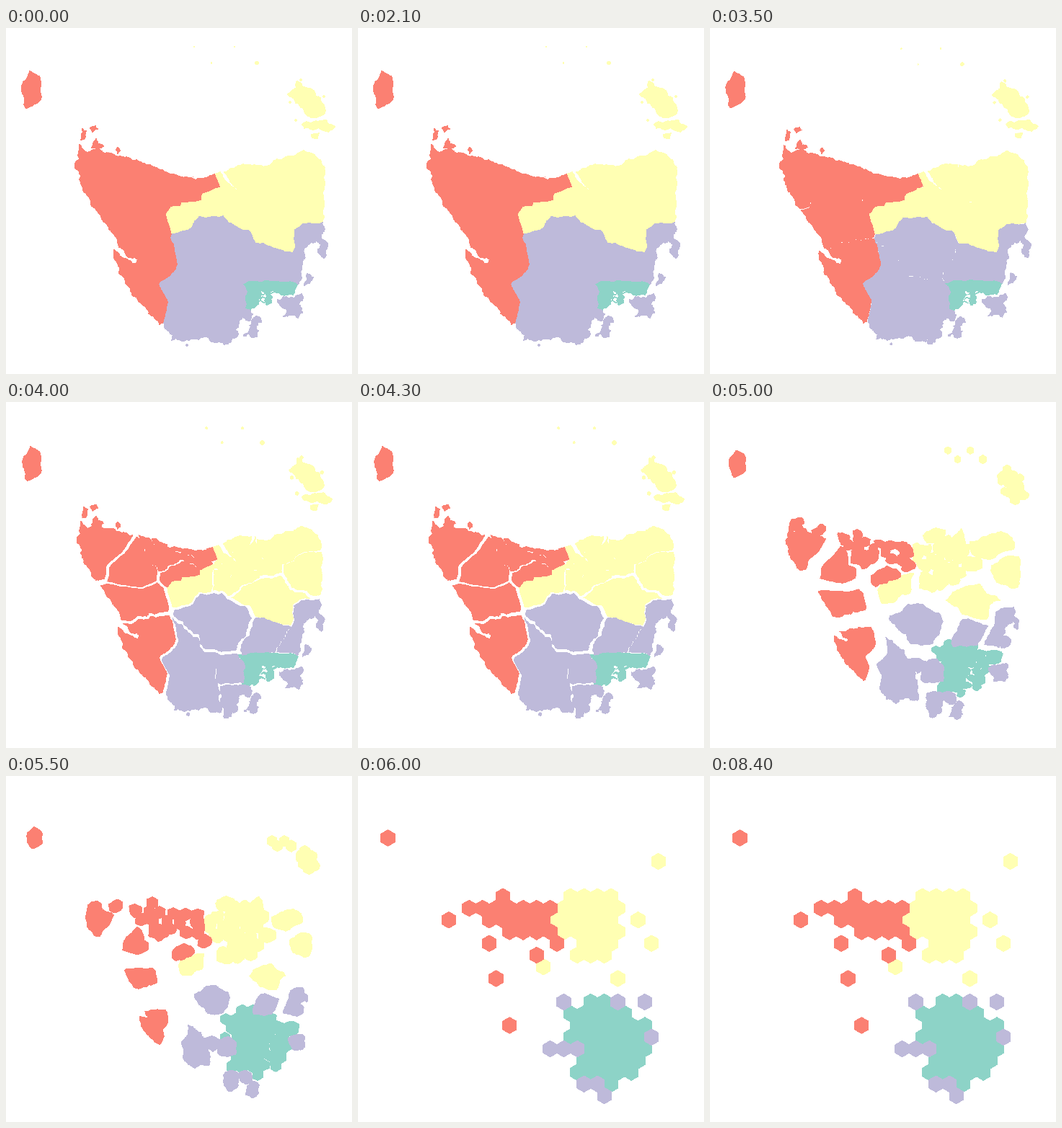
These frames come from a looping animation (480x480 px, 10000 ms). A matplotlib script:

```python
import math
import random

import matplotlib.pyplot as plt
import numpy as np
from matplotlib.animation import FuncAnimation
from matplotlib.collections import PolyCollection

SIZE, DPI = 480, 100
STEP_MS, STEPS = 500, 20
HOLD, MOVE = 6, 6
RED, YELLOW, PURPLE, TEAL = "#FB8072", "#FFFFB3", "#BEBADA", "#8DD3C7"
RADIUS = 10.83

rng = random.Random(12)
arcs = {}
shapes = []


# ---------- geometry helpers ----------
def rough(points, amp=0.15):
    """Midpoint displacement: makes a natural looking line."""
    out = [np.array(points[0], float)]

    def split(a, b):
        d = b - a
        size = math.hypot(*d)
        if size < 2.2:
            out.append(b)
            return
        mid = (a + b) / 2 + np.array([-d[1], d[0]]) * rng.uniform(-amp, amp)
        split(a, mid)
        split(mid, b)

    for p in points[1:]:
        split(out[-1], np.array(p, float))
    return np.array(out)


def arc(name, *points, amp=0.15):
    arcs[name] = rough(points, amp)


def island(*points, amp=0.2):
    return rough(points + points[:1], amp)[:-1]


def dot(x, y, r):
    return np.array([(x - r, y), (x, y - r), (x + r, y), (x, y + r)])


def ring(names):
    """Chain named arcs into a closed outline, flipping them as needed."""
    parts = [arcs[n] for n in names.split()]
    same = lambda p, q: np.allclose(p, q)
    first, second = parts[0], parts[1]
    if not (same(first[-1], second[0]) or same(first[-1], second[-1])):
        first = first[::-1]
    chain = [first]
    for part in parts[1:]:
        chain.append(part if same(part[0], chain[-1][-1]) else part[::-1])
    return np.vstack([c[:-1] for c in chain])


def clip(poly, a, b):
    """Keep the part of poly that is nearer to a than to b."""
    side = (poly - (a + b) / 2) @ (b - a)
    out = []
    for i in range(len(poly)):
        j = (i + 1) % len(poly)
        if side[i] <= 0:
            out.append(poly[i])
        if (side[i] <= 0) != (side[j] <= 0):
            f = side[i] / (side[i] - side[j])
            out.append(poly[i] + f * (poly[j] - poly[i]))
    return np.array(out).reshape(-1, 2)


def cells(poly, seeds):
    """Voronoi cells of the seeds inside poly."""
    seeds = [np.array(s, float) for s in seeds]
    for s in seeds:
        cell = poly
        for other in seeds:
            if other is not s and len(cell):
                cell = clip(cell, s, other)
        yield cell if len(cell) > 2 else dot(*s, 0.6)


# ---------- hexagon grid ----------
def center(row, col):
    return np.array([41.5 + 18.76 * (col + row % 2 / 2), 86 + 16.25 * row])


def hexagon(c):
    turn = np.radians(np.arange(7) * 60 - 90)
    return c + RADIUS * np.column_stack([np.cos(turn), np.sin(turn)])


def block(*rows):
    return [(r, c) for r, lo, hi in rows for c in range(lo, hi + 1)]


def shrink(slots, mid, to, sx, sy):
    """Seed points: the hexagon layout squeezed around a town."""
    for slot in slots:
        x, y = center(*slot) - mid
        yield (to[0] + x * sx + rng.uniform(-1.5, 1.5),
               to[1] + y * sy + rng.uniform(-1.2, 1.2))


# ---------- morphing ----------
def densify(poly):
    nxt = np.roll(poly, -1, axis=0)
    length = np.hypot(*(nxt - poly).T)
    step = min(2, length.sum() / 30)
    out = []
    for p, q, size in zip(poly, nxt, length):
        n = max(1, math.ceil(size / step))
        out.extend(p + (q - p) * i / n for i in range(n))
    return np.array(out)


def add(color, slot, *polys):
    c = center(*slot)
    corners = hexagon(c)
    for poly in polys:
        x, y = poly.T
        if x @ np.roll(y, -1) - y @ np.roll(x, -1) < 0:
            poly = poly[::-1]
        pts = densify(poly)
        length = np.hypot(*(np.roll(pts, -1, axis=0) - pts).T)
        u = (np.cumsum(length) - length) / length.sum()
        rel = pts - pts.mean(axis=0)
        best = None
        for shift in np.arange(0, 1, 1 / 48):
            v = (u + shift) % 1 * 6
            goal = np.column_stack([np.interp(v, range(7), corners[:, i]) for i in (0, 1)])
            score = (rel * (goal - c)).sum()
            if best is None or score > best[0]:
                best = score, goal
        shapes.append((color, pts, best[1], corners[:-1]))


def add_cells(color, outline, slots, seeds):
    for slot, cell in zip(slots, cells(outline, list(seeds))):
        add(color, slot, cell)


# ---------- north-west borders ----------
arc("nw_coast", (125, 252), (118, 244), (113, 232), (107, 222), (102, 210), (101, 198),
    (96, 192), (97, 186), (102, 182), (102, 162), (106, 168), (112, 174), (119, 170),
    (131, 170), (137, 174), (148, 175), (158, 178), (170, 180), (181, 183), amp=0.2)
arc("nw_plain", (181, 183), (172, 196), (164, 208), (150, 220), (140, 230), (139, 245), (137, 250), amp=0.06)
arc("nw_foot", (137, 250), (125, 252))
arc("plain_coast", (181, 183), (187, 186))
arc("plain_strip", (187, 186), (192, 203))
arc("plain_farm", (192, 203), (191, 225), (210, 228), (212, 236), amp=0.08)
arc("plain_hill", (212, 236), (211, 248), amp=0.06)
arc("plain_west", (211, 248), (202, 253), (190, 258), (165, 255), (150, 253), (137, 250), amp=0.07)
arc("strip_farm", (192, 203), (205, 203), (215, 206), (236, 208), (245, 210))
arc("strip_port", (248, 207), (245, 210))
arc("farm_port", (245, 210), (243, 219))
arc("farm_hill", (243, 219), (230, 226), (221, 234), (212, 236), amp=0.12)
arc("hill_port", (243, 219), (251, 223), (262, 225), (270, 232))
arc("hill_vale", (270, 232), (270, 238), (262, 240), (243, 241), (241, 246), (228, 247), (221, 257), amp=0.06)
arc("hill_west", (221, 257), (211, 248))
arc("west_vale", (221, 257), (224, 270), (229, 286), amp=0.05)
arc("west_lake", (229, 286), (227, 291))
arc("west_wild", (227, 291), (215, 292), (207, 295), (199, 292), (195, 298), (181, 297), (175, 302), (157, 304))
arc("west_coast", (157, 304), (155, 296), (149, 285), (140, 272), (132, 262), (125, 252), amp=0.12)
arc("wild_moor", (227, 291), (232, 300), (234, 312), (237, 327), (232, 338), (226, 344), (213, 352),
    (211, 356), (215, 364), (220, 372), (224, 380), (222, 392), (218, 407), amp=0.1)
arc("wild_coast", (218, 407), (213, 411), (206, 402), (198, 396), (192, 385), (183, 377), (177, 372),
    (170, 358), (165, 348), (157, 340), (156, 328), (150, 316), (150, 308), (156, 313), (160, 318),
    (167, 321), (174, 326), (181, 327), (183, 321), (178, 318), (172, 318), (166, 313), (161, 306),
    (157, 304), amp=0.2)
arc("strip_coast", (187, 186), (192, 188), (200, 190), (210, 195), (222, 200), (236, 204), (248, 207))
arc("port_coast", (248, 207), (262, 211), (274, 209), (281, 207), (289, 203))
arc("port_river", (289, 203), (293, 212), (296, 220), amp=0.06)
arc("port_vale", (296, 220), (288, 222), (280, 226), (272, 229), (270, 232), amp=0.08)

# ---------- north-east borders ----------
arc("vale_town", (296, 220), (289, 230), (288, 245), (286, 262))
arc("vale_lake", (286, 262), (278, 264), (268, 262), (262, 268), (258, 277), (252, 281), (240, 284), (229, 286), amp=0.1)
arc("town_coast", (289, 203), (297, 200), (299, 203))
arc("river", (299, 203), (307, 215), (318, 224), (333, 234), (320, 222), (311, 213))
arc("town_head", (345, 190), (342, 200), (328, 208), (311, 213))
arc("head_river", (311, 213), (303, 200))
arc("head_coast", (303, 200), (312, 195), (322, 191), (336, 190), (345, 190))
arc("town_ne", (345, 190), (346, 205), (353, 217), (378, 224), (384, 226))
arc("town_east", (384, 226), (384, 238))
arc("town_mid", (384, 238), (372, 242), (352, 243), (342, 248), (325, 255), (308, 270))
arc("town_lake", (308, 270), (301, 261), (286, 262))
arc("ne_coast", (345, 190), (360, 192), (368, 189), (376, 182), (392, 178), (400, 178), (413, 170),
    (428, 176), (436, 183), (441, 192), (440, 206))
arc("ne_east", (440, 206), (425, 207), (408, 211), (400, 221), (384, 226))
arc("east_coast", (440, 206), (442, 215), (439, 228), (441, 240), (439, 252), (439, 270))
arc("east_bay", (439, 270), (428, 272))
arc("east_mid", (428, 272), (418, 264), (405, 263), (397, 260), (391, 250), (384, 238))
arc("mid_bay", (428, 272), (412, 272), (406, 277), (401, 280), (400, 292), (402, 300), (398, 312), amp=0.1)
arc("mid_plain", (398, 312), (386, 311), (366, 303), (357, 299), (346, 299), amp=0.1)
arc("mid_lake", (346, 299), (341, 288), (336, 281), (325, 279), (315, 273), (308, 270), amp=0.1)

# ---------- southern borders ----------
arc("lake_plain", (346, 299), (341, 312), (337, 325), (326, 335), (322, 347))
arc("lake_dale", (322, 347), (300, 349), (284, 345), (273, 343))
arc("lake_moor", (273, 343), (268, 330), (266, 322), (250, 314), (243, 304), (232, 297), (227, 291), amp=0.2)
arc("plain_bay", (398, 312), (388, 326), (376, 343), (374, 350))
arc("plain_city", (374, 350), (360, 349), (345, 350), (333, 352), (325, 355))
arc("plain_dale", (325, 355), (322, 347))
arc("bay_coast", (439, 270), (441, 282), (437, 292), (445, 298), (443, 310), (441, 319), (436, 314),
    (437, 300), (432, 294), (424, 297), (418, 300), (413, 308), (414, 320), (410, 335), (408, 350),
    (405, 355), amp=0.26)
arc("bay_cape", (405, 355), (390, 351), (380, 351))
arc("bay_city", (380, 351), (374, 350))
arc("city_cape", (380, 351), (377, 367))
arc("city_coast", (377, 367), (370, 364), (366, 366), (369, 374), (368, 381), (362, 384), (359, 378),
    (362, 371), (356, 365), (350, 360), (353, 372), (350, 383), (344, 388), (338, 392), amp=0.22)
arc("city_neck", (338, 392), (332, 390))
arc("city_dale", (332, 390), (331, 376), (334, 366), (332, 361), (325, 355))
arc("cape_coast", (405, 355), (401, 362), (398, 370), (386, 371), (377, 367))
arc("dale_neck", (332, 390), (322, 390))
arc("dale_south", (322, 390), (308, 389), (296, 391))
arc("dale_moor", (296, 391), (290, 385), (291, 368), (286, 360), (273, 343))
arc("south_coast", (322, 390), (327, 397), (323, 408), (318, 418), (322, 425), (313, 430), (308, 438),
    (301, 436), amp=0.28)
arc("south_moor", (301, 436), (298, 420), (299, 405), (296, 391), amp=0.22)
arc("neck_coast", (338, 392), (342, 397), (339, 405), (331, 402), (327, 395), (322, 390), amp=0.25)
arc("moor_coast", (301, 436), (290, 436), (282, 431), (272, 429), (258, 431), (240, 432), (230, 433),
    (227, 420), (220, 415), (218, 407), amp=0.28)

# ---------- south-east city ----------
city = block((14, 15, 16), (15, 13, 17), (16, 14, 18), (17, 13, 18), (18, 15, 19),
             (19, 14, 18), (20, 14, 18), (21, 16, 16))
add_cells(TEAL, ring("plain_city bay_city city_cape city_coast city_neck city_dale"),
          city, shrink(city, (346, 368), (347, 368), 0.42, 0.34))
add(TEAL, (16, 19), ring("bay_cape cape_coast city_cape"))

# ---------- north-east ----------
town = block((5, 14, 16), (6, 13, 17), (7, 13, 16), (8, 13, 16), (9, 14, 16), (10, 15, 16))
big = {(7, 12): (296, 214), (8, 17): (362, 232), (10, 14): (300, 250)}
add_cells(YELLOW,
          ring("town_coast river town_head town_ne town_east town_mid town_lake vale_town port_river"),
          town + list(big),
          list(shrink(town, (322, 208), (326, 232), 0.33, 0.3)) + list(big.values()))
add(YELLOW, (11, 11), ring("hill_vale port_vale vale_town vale_lake west_vale"))
add(YELLOW, (5, 13), ring("head_coast town_head head_river"))
add(YELLOW, (7, 18), ring("ne_coast ne_east town_ne"))
add(YELLOW, (9, 19), ring("ne_east east_coast east_bay east_mid town_east"))
add(YELLOW, (12, 17), ring("town_mid east_mid mid_bay mid_plain mid_lake"))
add(YELLOW, (2, 20),
    island((404, 74), (410, 80), (418, 84), (428, 90), (436, 97), (439, 105), (443, 115), (440, 120),
           (432, 123), (424, 124), (415, 117), (409, 110), (402, 104), (398, 97), (391, 92), (396, 88),
           (403, 82)),
    island((411, 134), (420, 131), (430, 129), (444, 128), (456, 137), (447, 144), (438, 141),
           (425, 141), (414, 139)),
    island((424, 148), (434, 146), (432, 153), (425, 152)),
    dot(441, 95, 1.5), dot(394, 103, 1.5), dot(402, 128, 1.5), dot(409, 72, 1.5),
    dot(261, 26, 0.5), dot(317, 26, 0.5), dot(348, 48.5, 2.3), dot(285, 48.5, 0.4))

# ---------- south ----------
add(PURPLE, (14, 13), ring("vale_lake town_lake mid_lake lake_plain lake_dale lake_moor west_lake"))
add(PURPLE, (14, 17), ring("mid_plain plain_bay plain_city plain_dale lake_plain"))
add(PURPLE, (14, 19), ring("mid_bay east_bay bay_coast bay_cape bay_city plain_bay"),
    island((418, 341), (426, 346), (421, 354), (414, 357), (418, 348)))
add(PURPLE, (18, 12), ring("lake_moor dale_moor south_moor moor_coast wild_moor"), dot(251, 440, 1.3))
add_cells(PURPLE, ring("lake_dale plain_dale city_dale dale_neck dale_south dale_moor"),
          [(18, 13), (18, 14)], [(283, 352), (306, 371)])
add(PURPLE, (21, 14), ring("dale_south south_coast south_moor"))
add(PURPLE, (21, 15), ring("dale_neck city_neck neck_coast"))
add(PURPLE, (22, 16),
    island((347, 400), (354, 408), (347, 415), (350, 420), (348, 428), (337, 424), (330, 427),
           (338, 418), (341, 408), amp=0.3))
add(PURPLE, (17, 19),
    island((377, 377), (385, 373), (397, 374), (410, 369), (411, 378), (406, 384), (411, 395),
           (405, 402), (396, 398), (385, 400), (390, 392), (382, 386), amp=0.26))

# ---------- north-west ----------
add(RED, (0, 0),
    island((33, 60), (46, 67), (48, 74), (47, 85), (49, 96), (45, 102), (37, 107), (28, 111),
           (25, 106), (26, 98), (22, 88), (24, 75), (30, 68), amp=0.12))
add(RED, (7, 4), ring("nw_coast nw_plain nw_foot"),
    island((106, 140), (111, 143), (109, 153), (104, 155), (105, 147)),
    island((117, 139), (124, 136), (127, 140), (120, 144)),
    island((121, 160), (125, 154), (127, 161), (135, 164), (128, 167), (119, 166)))
add(RED, (6, 6), island((138, 176), (148, 176), (152, 179), (143, 181)),
    island((155, 166), (158, 170), (155, 174)))
add(RED, (9, 7), ring("nw_plain plain_coast plain_strip plain_farm plain_hill plain_west"))
add(RED, (8, 9), ring("strip_farm farm_port farm_hill plain_farm"))
add(RED, (10, 11), ring("farm_hill hill_port hill_vale hill_west plain_hill"))
add(RED, (12, 8), ring("plain_west hill_west west_vale west_lake west_wild west_coast nw_foot"))
add(RED, (16, 9), ring("west_wild wild_moor wild_coast"))
add_cells(RED, ring("strip_coast strip_port strip_farm plain_strip"),
          [(6, 7), (7, 7), (5, 8), (7, 8), (6, 8), (6, 9), (8, 10), (7, 9), (6, 10)],
          [(197, 193), (203, 199), (209, 196), (211, 201), (215, 198), (220, 201), (227, 203),
           (232, 207), (238, 206)])
add_cells(RED, ring("port_coast port_river port_vale hill_port farm_port strip_port"),
          [(7, 10), (6, 11), (6, 12), (8, 11), (8, 12), (9, 12), (7, 11)],
          [(247, 214), (254, 210), (262, 212), (255, 218), (266, 217), (274, 222), (284, 211)])

# ---------- animation ----------
fig = plt.figure(figsize=(SIZE / DPI, SIZE / DPI), dpi=DPI, facecolor="white")
ax = fig.add_axes([0, 0, 1, 1])
ax.set(xlim=(0, SIZE), ylim=(SIZE, 0))
ax.axis("off")
colors = [s[0] for s in shapes]
layer = PolyCollection([s[1] for s in shapes], facecolors=colors, edgecolors=colors,
                       linewidths=0, antialiaseds=False)
ax.add_collection(layer, autolim=False)


def draw(step):
    t = min(max((step - HOLD) / MOVE, 0), 1) ** 2
    if t == 1:
        layer.set_verts([s[3] for s in shapes])
    else:
        layer.set_verts([a + (b - a) * t for _, a, b, _ in shapes])
    # a hairline closes the seams while the pieces touch
    layer.set_linewidth(0.35 if t in (0, 1) else 0)
    return [layer]


anim = FuncAnimation(fig, draw, frames=STEPS, interval=STEP_MS, repeat=True, repeat_delay=0, blit=False)
plt.show()
```
